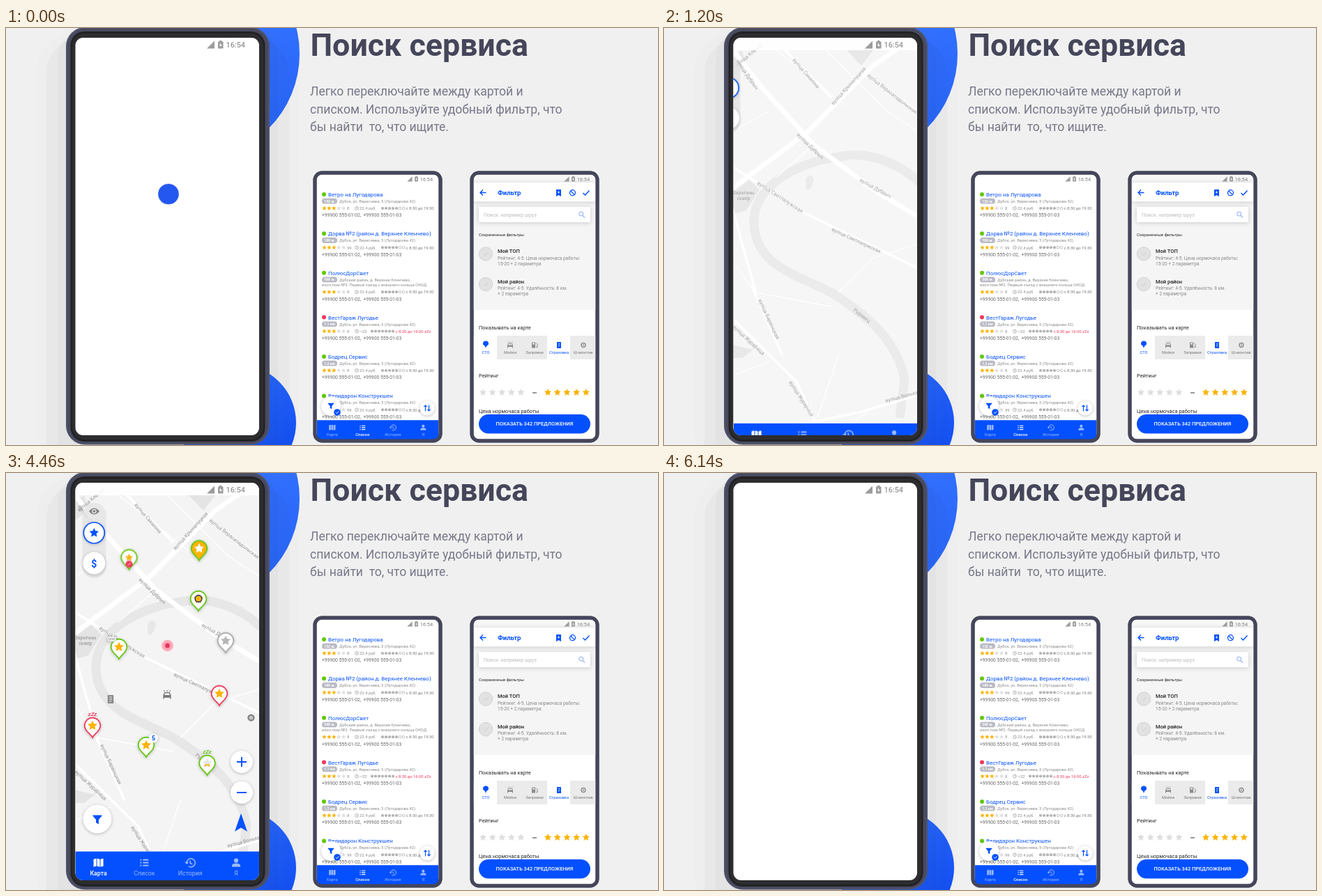
These frames come from a looping animation (935 by 599 pixels, 6.64 s). An HTML page:

```html
<!DOCTYPE html>
<html lang="ru">
<head>
<meta charset="utf-8">
<title>Поиск сервиса</title>
<style>
html, body { margin: 0; width: 100%; height: 100%; overflow: hidden; background: #f0f0f0; }
svg { display: block; width: 935px; height: 599px; font-family: Roboto, Arial, sans-serif; }
.sh { filter: drop-shadow(0 1.5px 2px rgba(0,0,0,.25)); }
.soft { filter: drop-shadow(0 1px 3px rgba(0,0,0,.18)); }
</style>
</head>
<body>
<script>
const LOOP = 6640, BLUE = '#0450ff', GREEN = '#62c80c', RED = '#f2385a', GOLD = '#fbb308', SLATE = '#45465a';
let css = '';

// Keyframes from [ms, declarations, easing to the next stop]
function anim(name, ...stops) {
  stops.unshift([0, stops[0][1]]);
  stops.push([LOOP, stops[stops.length - 1][1]]);
  css += `@keyframes ${name}{` + stops.map(([t, c, e]) =>
    `${(t / LOOP * 100).toFixed(4)}%{${c}${e ? ';animation-timing-function:' + e : ''}}`).join('') +
    `}.${name}{animation:${name} ${LOOP}ms linear infinite}`;
}

const esc = s => s.replace(/ {2}/g, '\u00a0 ');
const text = (x, y, size, s, fill = '#333', more = '') =>
  `<text x="${x}" y="${y}" font-size="${size}" fill="${fill}" ${more}>${esc(s)}</text>`;
const MID = 'text-anchor="middle"', MED = 'font-weight="500"', BOLD = 'font-weight="700"';
const circle = (x, y, r, fill, more = '') => `<circle cx="${x}" cy="${y}" r="${r}" fill="${fill}" ${more}/>`;
const rect = (x, y, w, h, r, fill, more = '') =>
  `<rect x="${x}" y="${y}" width="${w}" height="${h}" rx="${r}" fill="${fill}" ${more}/>`;
const line = (d, color, w = 1, more = '') => `<path d="${d}" fill="none" stroke="${color}" stroke-width="${w}" ${more}/>`;
const shape = (d, fill, more = '') => `<path d="${d}" fill="${fill}" ${more}/>`;
const at = (x, y, s, body) => `<g transform="translate(${x} ${y}) scale(${s})">${body}</g>`;
const group = (cls, body) => `<g class="${cls}">${body}</g>`;

function star(x, y, r, fill) {
  let d = '';
  for (let i = 0; i < 10; i++) {
    const a = i * Math.PI / 5, q = i % 2 ? r * .48 : r;
    d += (i ? 'L' : 'M') + (x + q * Math.sin(a)).toFixed(2) + ' ' + (y - q * Math.cos(a)).toFixed(2);
  }
  return shape(d + 'Z', fill, `stroke="${fill}" stroke-width="${r * .12}" stroke-linejoin="round"`);
}
const stars = (x, y, step, r, gold, all = 5) =>
  Array.from({ length: all }, (_, i) => star(x + i * step, y, r, i < gold ? GOLD : '#dedede')).join('');
const week = (x, y, step, r, open) => Array.from({ length: 7 }, (_, i) => open.includes(i)
  ? circle(x + i * step, y, r - .3, 'none', 'stroke="#aaa" stroke-width=".7"')
  : circle(x + i * step, y, r, '#b4b4b8')).join('');

// Icons
const funnel = c => shape('M-6-6H6V-5L1.8 0V6L-1.8 4V0L-6-5Z', c);
const icons = [
  shape('M-7-5L-3-6V5L-7 6ZM-2-6L2-5V6L-2 5ZM3-5L7-6V5L3 6Z', '#fff'),
  line('M-6-4H-4M-2-4H6M-6 0H-4M-2 0H6M-6 4H-4M-2 4H6', '#fff', 1.8),
  line('M-5 0A6 6 0 1 1-2.5 5M0-3V.5L3 2.5', '#fff', 1.5) + shape('M-8-1H-2L-5 2.5Z', '#fff'),
  circle(0, -3, 3.1, '#fff') + shape('M-6 6V4C-6 0 6 0 6 4V6Z', '#fff')
];
const tabs = ['Карта', 'Список', 'История', 'Я'];
const nav = active => rect(0, 0, 263, 42, 0, BLUE) + tabs.map((s, i) =>
  `<g opacity="${i === active ? 1 : .6}">` + at(33 + i * 65.7, 16, 1, icons[i]) +
  text(33 + i * 65.7, 34, 8.8, s, '#fff', MID + (i === active ? ' ' + MED : '')) + '</g>').join('');
const status = (x, y, s) => at(x, y, s, shape('M-55 1.5L-44-9.5V1.5Z', '#9c9c9c') +
  rect(-39, -8.5, 7.5, 10, 1, '#9c9c9c') + rect(-37, -10, 3.5, 2, 0, '#9c9c9c') +
  shape('M-35-7L-37.2-3H-35.4V0L-33.2-4H-35Z', '#fff') +
  text(0, 0, 10.8, '16:54', '#979797', 'text-anchor="end" ' + MED));
const frame = x => rect(x, 208, 180, 385, 10, '#fff', `stroke="${SLATE}" stroke-width="5"`);

const PHONES = '+99900 555-01-02,  +99900 555-01-03';
const STREET = 'Дубск, ул. Вереснева, 5 (Лугодарова 42';

// List screen
function item(y, title, dist, rate, price, o = {}) {
  const g = '#8a8a8a', k = o.second ? 7.5 : 0, n = o.red ? -15 : 0;
  return circle(456, y, 3, o.red ? RED : GREEN) + text(462, y + 3, 7.95, title, BLUE) +
    rect(453, y + 5.8, 22, 7.8, 3.9, '#b9bac4') + text(464, y + 11.7, 5.2, dist, '#fff', MID + ' ' + BOLD) +
    text(478, y + 12, 5.85, o.first || STREET + ')', g) + (o.second ? text(453, y + 19.5, 5.85, o.second, g) : '') +
    stars(456.5, y + 20 + k, 6.9, 2.9, 3) + text(489, y + 22.2 + k, 5.9, rate, g) +
    circle(503, y + 20 + k, 2.4, 'none', 'stroke="#999" stroke-width=".7"') +
    line(`M503 ${y + 18.5 + k}v1.7h1.3`, '#999', .6) + text(507, y + 22.2 + k, 5.9, price, g) +
    week(540 + n, y + 20 + k, 5, 2.1, o.red ? [] : [5, 6]) +
    text(573.5 + n, y + 22.2 + k, 5.85, o.red ? 'с 8:30 до 16:00 zZz' : 'с 8:30 до 19:30', o.red ? RED : '#777') +
    text(453, y + 32.3 + k, 6.75, PHONES, '#6a6a6a');
}
const listScreen = frame(443) + status(612, 219.5, .667) +
  item(239, 'Ветро на Лугодарова', '132 м.', '8', '22.4 руб.') +
  item(295.3, 'Дорва №2 (район д. Верхнее Кленчево)', '189 м.', '99', '22.4 руб.') +
  item(351.7, 'ПолюсДорСвет', '568 м.', '8', '22.4 руб.', {
    first: 'Дубский район, д. Верхнее Кленчево,', second: 'изол.пом.№2. Первый съезд с внешнего кольца ОКОД' }) +
  item(415.6, 'ВестГараж Лугодье', '1,1 км', '8', '~22', { red: 1 }) +
  item(472, 'Бодрец Сервис', '1,2 км', '8', '22.4 руб.') +
  item(528.4, 'Велидарон Конструкшен', '1,3 км', '99', '22.4 руб.') +
  group('sh', circle(466, 543, 14, '#fff')) + at(466, 543, .72, funnel(BLUE)) +
  circle(475, 552, 4.8, BLUE) + line('M472.8 552L474.5 553.7L477.3 550.5', '#fff', .9) +
  group('sh', circle(604, 546, 10.5, '#fff')) +
  line('M601.5 550.5V542M599.3 544.2L601.5 542L603.7 544.2M606.5 541.5V550M604.3 547.8L606.5 550L608.7 547.8', BLUE, 1.2) +
  at(446, 563.3, .662, nav(1)) + rect(443, 208, 180, 385, 10, 'none', `stroke="${SLATE}" stroke-width="5"`);

// Filter screen
const saved = (y, title, a, b) => circle(688, y, 9.7, '#e2e2e2', 'stroke="#d2d2d2"') +
  line(`M685 ${y}l2.5 2.5l4-5`, '#cfcfcf') + text(705, y - 1.5, 7.5, title, '#222', MED) +
  text(705, y + 8, 6.6, a, '#888') + text(705, y + 16, 6.6, b, '#888');
const kinds = ['СТО', 'Мойки', 'Заправки', 'Страховка', 'Ш-монтаж'];
const kindIcon = [
  c => shape('M0 5C-1-1-4 1-4-2A4 4 0 0 1 4-2C4 1 1-1 0 5Z', c),
  c => line('M-3.500 4V0L-2.3-2.500H2.3L3.500 0V4M-4 1H4M-3-5V-4M0-5V-4M3-5V-4', c, 1) + rect(-3.500, 0, 7, 2.600, .5, c),
  c => rect(-4, -4, 5, 8, 0, c) + line('M2-3L4-1V3H2', c, 1) + rect(-3, -3, 3, 2, 0, '#eee'),
  c => rect(-3, -4.5, 6, 9, .5, c) + line('M-1-2H1.5M-1 0H1.5M-1 2H.5', '#fff', .7),
  c => circle(0, 0, 3, 'none', `stroke="${c}" stroke-width="1.4"`) + circle(0, 0, 1.1, c)
];
const filterScreen = frame(668) + rect(670.5, 250, 175, 155, 0, '#f5f5f5') + rect(670.5, 211, 175, 11, 0, '#f7f7f7') +
  group('soft', rect(670.5, 222, 175, 27, 0, '#fff')) + status(837, 219.5, .667) +
  line('M688.5 236.5H680.5M684 232.5L680 236.5L684 240.5', BLUE, 1.4) + text(705, 239.8, 9.5, 'Фильтр', BLUE, BOLD) +
  shape('M789 232H796V242L792.5 240L789 242Z', BLUE) + line('M790.7 236H794.3M792.5 234.2V237.8', '#fff', .8) +
  circle(812.5, 236.7, 4, 'none', `stroke="${BLUE}" stroke-width="1.3"`) + line('M809.8 234L815.2 239.4', BLUE, 1.3) +
  line('M827.5 237L830.5 240L836.5 233.5', BLUE, 1.5) +
  group('soft', rect(678, 257, 160, 22, 1, '#fff')) + text(685, 270.7, 7.1, 'Поиск: например шруз', '#bcbcbc') +
  circle(824.7, 267, 3, 'none', 'stroke="#86a9f4"') + line('M827 269.3L830 272.3', '#86a9f4', 1.2) +
  text(678, 298.7, 6, 'Сохраненные фильтры', '#222') +
  saved(324.5, 'Мой ТОП', 'Рейтинг: 4-5. Цена нормочаса работы:', '15-20 + 2 параметра') +
  saved(368, 'Мой район', 'Рейтинг: 4-5. Удалённость: 8 км.', '+ 2 параметра') +
  text(678, 432.6, 7.5, 'Показывать на карте', '#222') + rect(670.5, 442, 175, 34, 0, '#ebebeb') +
  kinds.map((s, i) => {
    const on = i === 0 || i === 3, x = 688 + i * 35;
    return (on ? rect(x - 17, 442, 33, 34, 0, '#fff') : '') + at(x, 455.5, 1, kindIcon[i](on ? BLUE : '#8b8b8b')) +
      text(x, 468.3, 5.7, s, on ? BLUE : '#777', MID);
  }).join('') +
  text(678, 501.5, 7.5, 'Рейтинг', '#222') + stars(684, 523.5, 13.6, 4.8, 0) + line('M755 524H761', '#333') +
  stars(777, 523.5, 13.7, 4.8, 5) + text(678, 553, 7.5, 'Цена нормочаса работы', '#222') +
  rect(678, 555, 160, 27.5, 13.7, BLUE) + text(758, 571.3, 7.4, 'ПОКАЗАТЬ 342 ПРЕДЛОЖЕНИЯ', '#fff', MID + ' ' + MED) +
  rect(668, 208, 180, 385, 10, 'none', `stroke="${SLATE}" stroke-width="5"`);

// Map
const street = (x, y, deg, s) => `<text transform="translate(${x} ${y}) rotate(${deg})" font-size="7.3" fill="#919191">${s}</text>`;
const map = rect(98, 14, 267, 572, 0, '#f4f4f4') +
  shape('M98 236L122 218L137 232L118 262L98 268ZM262 32H300L283 54ZM98 455L128 462L112 474H98ZM98 40L112 32L118 52L98 70Z', '#e4e4e4') +
  line('M366 222C340 196 300 180 265 183C200 189 128 222 129 280C131 342 190 354 240 380C287 410 334 446 345 505L338 560', '#e7e7e7', 13) +
  shape('M203 222C202 210 214 210 215 217C213 226 210 234 204 232Z', '#e7e7e7') +
  line('M96 28L140 85L215 168L300 232L366 272M366 8L300 54L205 150L96 232', '#fff', 7) +
  line('M172 30L240 100M285 62L366 122M96 198L200 265L366 346M125 370L170 470M96 415L190 508L228 590M96 250L112 310L132 380M170 575L280 552L366 527', '#fff', 3.5) +
  line('M140 15L262 112M232 32L320 120L366 150M96 150L150 120M160 215L215 168M250 380L300 330L366 310M240 590L300 545M96 330L130 380L240 400M96 500L150 480M220 560L250 470', '#fff', 1.3) +
  street(105, 56, -40, 'вуліца Клёнаў') + street(103, 48, 55, 'вуліца Дубрыч') + street(184, 46, 49, 'вуліца Сакаліна') +
  street(243, 111, -48, 'вуліца Крыналуцкая') + street(291, 69, 38, 'вуліца Верасападольская') +
  street(190, 154, 44, 'вуліца Дубрыч') + street(280, 220, 29, 'вуліца Дубрыч') +
  street(133, 224, 33, 'вуліца Светлалужская') + street(240, 291, 25, 'вуліца Светлалужская') +
  street(135, 391, 65, 'вуліца Барвінцкая') + street(98, 430, 43, 'вуліца Жураўніца') +
  street(179, 509, 57, 'вуліца Жураўніца') + street(271, 406, 38, 'Рудавец') + street(318, 538, -15, 'вуліца Вольхавая') +
  text(114, 239, 7, 'Зарнічны', '#919191', MID) + text(114, 247, 7, 'сквер', '#919191', MID);

// Pins are anchored at the tip
const drop = 'M0 0C-3-6-11.3-9-11.3-17A11.3 11.3 0 1 1 11.3-17C11.3-9 3-6 0 0Z';
const face = (stroke, inner, fill = '#fff') => shape(drop, fill, `stroke="${stroke}" stroke-width="1.7"`) + inner;
const pinStar = (c = GOLD) => star(0, -17, 6.6, c);
const zzz = c => text(0, -31, 8, 'zZz', c, MID + ' ' + MED + ' font-style="italic"');
const pins = [
  [176.5, 138.5, 1410, face(GREEN, star(0, -16, 6.3, '#e6e6e6') + star(0, -17, 5, GOLD) + circle(0, -7.5, 5, RED) + line('M-2-5.5L2-9.5', '#fff'))],
  [277, 125.5, 1470, face(GREEN, pinStar('#fff'), GOLD)],
  [276, 198, 1530, group('tapped', face(GREEN, pinStar() + group('touch', circle(0, -17.5, 4.8, GOLD, 'stroke="#36405f" stroke-width="1.7"'))))],
  [315, 258, 1590, face('#ababab', pinStar('#b5b5b5'))],
  [162, 267, 1650, face(GREEN, pinStar()) + rect(-17, -32, 13, 7, 3.5, '#fff', 'stroke="#bbb" stroke-width=".6"') +
    [-13.8, -10.5, -7.2].map(x => circle(x, -28.5, 1.4, 'none', 'stroke="#888" stroke-width=".7"')).join('')],
  [288.5, 434, 1730, face(GREEN, star(0, -17, 6.6, '#e6e6e6') + shape('M-4.5-12L-3.2-15.5H3.2L4.5-12L0-14Z', GOLD)) + zzz(GREEN)],
  [124, 380, 2030, face(RED, pinStar()) + zzz(RED)],
  [306, 334, 2070, face(RED, pinStar())],
  [201, 408, 2120, face(GREEN, pinStar()) + circle(10.5, -27, 6.5, '#fff') + text(10.5, -23.8, 9, '5', BLUE, MID + ' ' + BOLD)]
];
const pinLayer = pins.map(([x, y, t, body], i) => {
  anim('pin' + i, [t, 'transform:scale(0)', 'ease-out'], [t + 190, 'transform:scale(1.12)', 'ease-in-out'], [t + 310, 'transform:scale(1)']);
  return at(x, y, 1, group('pin' + i, group('sh', body)));
}).join('');
const places = at(150, 325, 1.2, rect(-3.5, -5, 7, 10, .5, '#888') + line('M-1.5-2.5H1.8M-1.5 0H1.8M-1.5 2.5H1', '#fff', .8)) +
  at(231, 319, 1.4, kindIcon[1]('#777')) +
  at(351.5, 351.5, 1.25, circle(0, 0, 3.6, '#999', 'stroke="#777"') + circle(0, 0, 1.6, '#fff') + circle(0, 0, .8, '#777'));
const here = at(231.5, 248, 1, group('ring', circle(0, 0, 19, '#ff9db0')) +
  group('spot', circle(0, 0, 8.3, '#ffa9b8') + circle(0, 0, 3.4, '#e5365e')));

// Floating controls
const round = (x, y, r, body) => at(x, y, 1, group('sh', circle(0, 0, r, '#fff')) + body);
const side = rect(109.5, 43, 34, 108, 17, '#e4e4e4', 'opacity=".85"') +
  shape('M119 55Q126.5 46 134 55Q126.5 64 119 55Z', '#808080') + circle(126.5, 55, 3.2, '#e4e4e4') + circle(126.5, 55, 1.8, '#808080') +
  round(126.3, 86, 15.5, circle(0, 0, 15, '#fff', `stroke="${BLUE}" stroke-width="1.7"`) + star(0, 0, 6.3, BLUE)) +
  round(126.3, 129.5, 16, text(0, 5, 14, '$', BLUE, MID + ' ' + BOLD));
const plus = round(338, 415, 16, line('M-7 0H7M0-7V7', BLUE, 1.9));
const minus = round(338, 459, 16, line('M-7 0H7', BLUE, 1.9));
const arrow = at(337, 502, 1, shape('M0-13L9 13L0 7.5L-9 13Z', BLUE));
const filter = round(131, 497, 20.5, at(0, 1, 1.08, funnel(BLUE)));

// Place card
const card = group('soft', rect(90, 386, 16, 170, 2, '#fff') + rect(357, 386, 16, 170, 2, '#fff') + rect(113, 381, 237.5, 156, 2, '#fff')) +
  circle(129.3, 403.7, 4.6, GREEN) + text(138, 408, 11.9, 'Дорва №2 (район д. Верхнее Лозо)', BLUE) +
  rect(125, 420, 32.5, 12, 6, '#b9bac4') + text(141, 429, 7.8, '189 м.', '#fff', MID + ' ' + BOLD) +
  text(162, 430, 8.75, STREET + ';', '#a6a6a6') + text(125, 441.7, 8.75, 'пр-т Ладосвета, 157а)', '#a6a6a6') +
  stars(130.5, 460, 10.3, 4.4, 3) + text(179, 463, 8.8, '(8)', '#999') +
  week(230.5, 460, 7.2, 3, [0, 1]) + text(281, 463, 8.7, 'с 8:30 до 19:30', '#999') +
  text(125, 478, 10.05, PHONES, '#999') + text(125, 513.5, 11.3, 'Записаться:', '#222') +
  rect(201, 496, 64, 27, 13.5, BLUE) + text(233, 513.7, 11.4, 'СЕЙЧАС', '#fff', MID + ' ' + MED) +
  rect(271.7, 496.7, 67.5, 25.6, 12.8, '#fff', `stroke="${BLUE}" stroke-width="1.4"`) + text(305.5, 513.7, 11.4, 'НА ДАТУ', BLUE, MID + ' ' + MED);

// Motion
const X = v => `transform:translateX(${v}px)`, Y = v => `transform:translateY(${v}px)`, S = v => `transform:scale(${v})`;
const OUT = 'cubic-bezier(.2,.6,.3,1)', IO = 'ease-in-out';
anim('grow', [30, S(.23), 'cubic-bezier(.3,0,.1,1)'], [690, S(1)]);
anim('leave', [720, 'opacity:1'], [940, 'opacity:0']);
anim('app', [720, 'opacity:0'], [721, 'opacity:1'], [6020, 'opacity:1'], [6140, 'opacity:0']);
anim('mapIn', [720, 'opacity:0'], [1300, 'opacity:1']);
anim('navIn', [980, Y(41), IO], [1480, Y(0)]);
anim('sideIn', [1010, X(-50), IO], [1500, X(0)]);
anim('leftIn', [1350, X(-60), OUT], [1800, X(0)]);
anim('rightIn', [1350, X(50), OUT], [1800, X(0)]);
anim('placesIn', [1500, 'opacity:0'], [1800, 'opacity:1']);
anim('spot', [1900, S(0), OUT], [2200, S(1)]);
anim('ring', [2090, 'opacity:0;' + S(.3)], [2100, 'opacity:.7;' + S(.3), OUT], [2430, 'opacity:0;' + S(1)]);
anim('tapped', [4470, S(1), OUT], [4740, S(1.92), IO], [4900, S(1.73), IO], [5120, S(1.72)]);
anim('touch', [4459, 'opacity:0'], [4460, 'opacity:1'], [4520, 'opacity:1'], [4680, 'opacity:0']);
anim('cardIn', [4459, Y(220)], [4460, Y(168), OUT], [4880, Y(0)]);
const lift = (name, start, top, mid) => anim(name, [start, Y(0), OUT], [4900, Y(top), IO], [5135, Y(mid), 'ease-out'], [5390, Y(-153)]);
lift('plusUp', 4470, -189, -166);
lift('minusUp', 4490, -180, -163);
lift('arrowUp', 4510, -169, -160);
lift('filterUp', 4510, -168, -160);

const phone = circle(269, 37, 152, 'url(#top)') + circle(332.5, 567, 83.5, 'url(#low)') +
  rect(42, 0, 378, 640, 70, '#000', 'opacity=".008"') + rect(58, 14, 348, 640, 50, '#000', 'opacity=".024"') +
  rect(74, 4, 316, 640, 38, '#000', 'opacity=".02"') +
  rect(86, -1, 292, 599.5, 27, '#50536b') + rect(88, 1, 288, 595.5, 25, '#484a5e') + rect(92.5, 5, 279, 589, 20, '#222224') +
  rect(95, 8, 274, 583, 17, '#2d2d2f') + rect(99.5, 14, 263.5, 571, 11, '#fff') +
  '<g clip-path="url(#screen)">' +
  at(233, 236, 1, group('leave', group('grow', circle(0, 11.5, 64.5, '#2457f0')))) +
  group('app', group('mapIn', map + rect(98, 14, 267, 18, 0, '#fff', 'opacity=".88"')) +
    group('placesIn', places) + here + pinLayer + group('sideIn', side) +
    group('leftIn', group('filterUp', filter)) +
    group('rightIn', group('plusUp', plus) + group('minusUp', minus) + group('arrowUp', arrow)) +
    group('cardIn', card) + group('navIn', at(99.5, 543.7, 1.002, nav(0)))) +
  status(343, 28, 1) + '</g>';

const gradient = (id, a, b) => `<linearGradient id="${id}" x1="0" y1="0" x2="1" y2="1"><stop offset=".3" stop-color="${a}"/><stop offset="1" stop-color="${b}"/></linearGradient>`;
const heading = text(436.5, 40, 44.7, 'Поиск сервиса', SLATE, BOLD) +
  ['Легко переключайте между картой и', 'списком. Используйте удобный фильтр, что', 'бы найти  то, что ищите.']
    .map((s, i) => text(436, 97 + i * 25.5, 17.55, s, '#777889')).join('');

document.body.innerHTML = `<style>${css}</style><svg viewBox="0 0 935 599"><defs>` +
  gradient('top', '#3d7bff', '#2563fc') + gradient('low', '#2e6dff', '#0b48f2') +
  `<clipPath id="screen">${rect(99.5, 14, 263.5, 571, 11, '#fff')}</clipPath></defs>` +
  phone + heading + listScreen + filterScreen + '</svg>';
</script>
</body>
</html>
```
